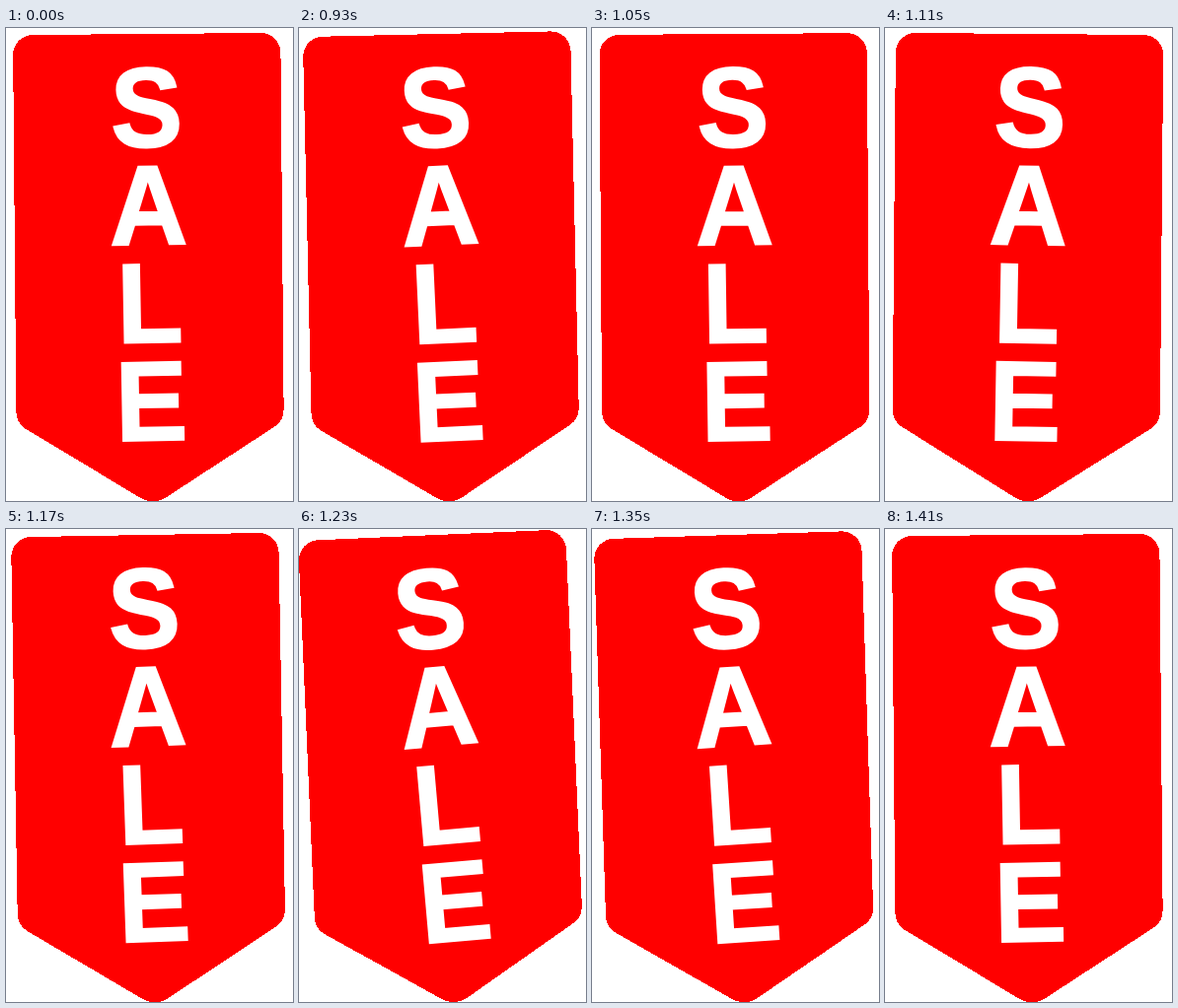
Animation, 291 px wide and 480 px high, one loop 2700 ms. Source, as an HTML page:

```html
<!DOCTYPE html>
<html lang="en">
<head>
<meta charset="utf-8">
<title>Sale tag</title>
<style>
  html, body { margin: 0; width: 100%; height: 100%; overflow: hidden; background: #fff; }
  svg { display: block; width: 100%; height: 100%; }
  text {
    font: bold 109px "Liberation Sans", Arial, sans-serif;
    fill: #fff; stroke: #fff; stroke-width: 2; text-anchor: middle;
  }
</style>
</head>
<body>
<svg viewBox="0 0 291 480">
  <g id="tag">
    <path fill="#f00" shape-rendering="crispEdges" d="M9 26 A20 20 0 0 1 29 6 H260.3 A20 20 0 0 1 280.3 26 V388
      Q280.3 399.5 271.5 405.3 L161 476 Q147 485 133 476 L18 405.5 Q9 399.5 9 388 Z"/>
    <g id="word">
      <text transform="scale(1 1.053)" y="114.2"><tspan x="144.8">S</tspan><tspan x="144.8" dy="94.4">A</tspan><tspan x="144.8" dy="94.4">L</tspan><tspan x="144.8" dy="94.4">E</tspan></text>
    </g>
  </g>
</svg>
<script>
const LOOP = 2700, SHAKE_START = 930, SHAKE_END = 1410, STEP = 30;
const REST = -0.5;

// [step, degrees] of the swing, joined by straight lines
const swing = [[0, -1.3], [1, -1.55], [2, -1.3], [6, 0.5], [10, -2.5], [11.5, -2.8], [13, -2.5], [16, REST]];

const tag = document.getElementById('tag');
const word = document.getElementById('word');

function angleAt(time) {
  if (time < SHAKE_START || time >= SHAKE_END) return REST;
  const step = Math.floor((time - SHAKE_START) / STEP);
  const next = swing.findIndex(([at]) => at > step);
  const [from, a] = swing[next - 1];
  const [to, b] = swing[next];
  return a + (b - a) * (step - from) / (to - from);
}

function draw(now) {
  const angle = angleAt(now % LOOP);
  // The word turns inside the tag, so it tilts twice as far.
  tag.setAttribute('transform', `rotate(${angle} 145 236)`);
  word.setAttribute('transform', `rotate(${angle} 145 210)`);
}

const start = performance.now();
function tick() {
  draw(performance.now() - start);
  requestAnimationFrame(tick);
}
tick();
</script>
</body>
</html>
```
